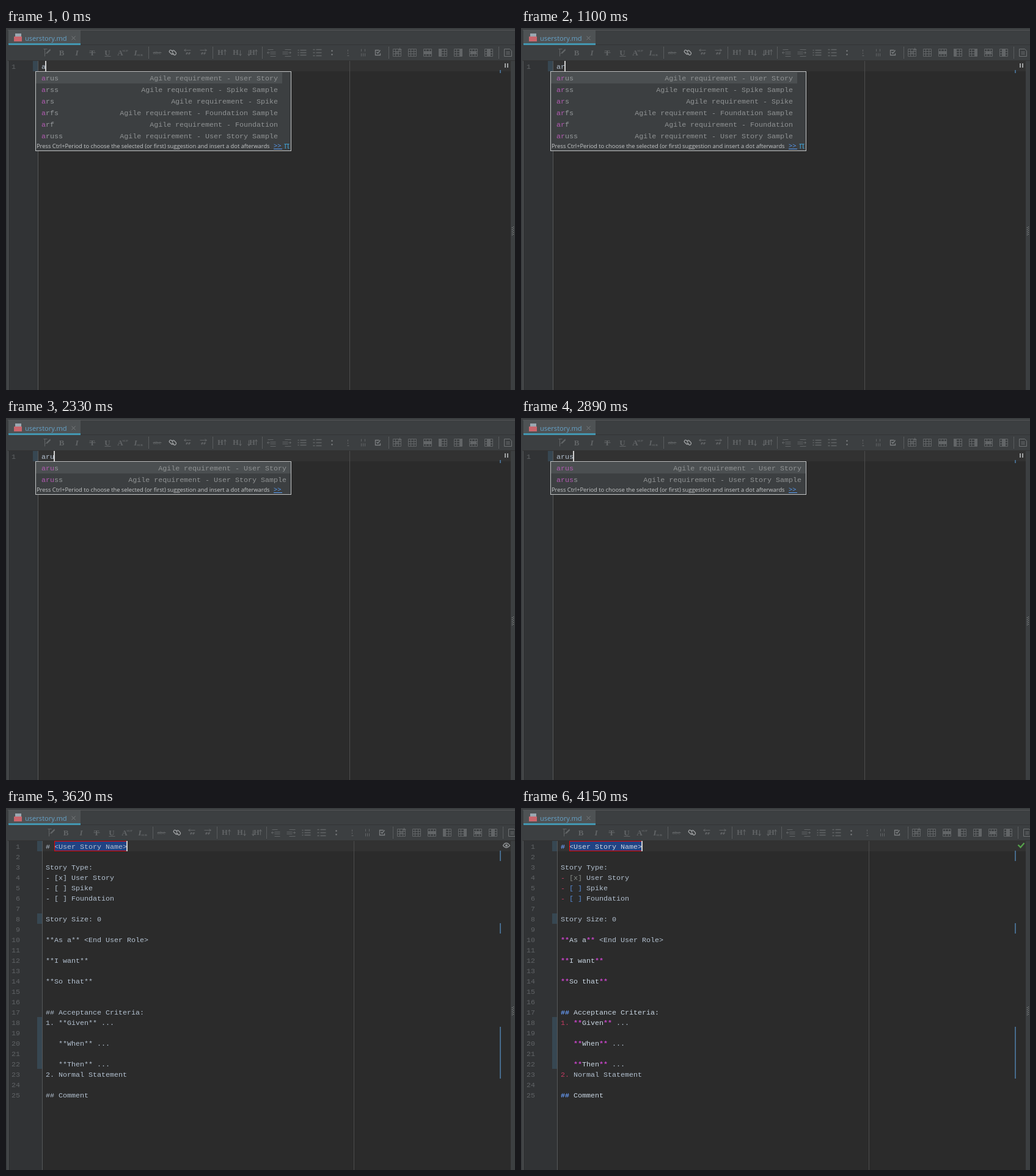
These frames come from a looping animation (833x594 px, 5.01 s). An HTML page with a canvas:

```html
<!DOCTYPE html>
<html lang="en">
<head>
<meta charset="utf-8">
<title>Live template</title>
<style>
html, body { margin: 0; width: 100%; height: 100%; overflow: hidden; background: #2b2b2b; }
canvas { display: block; }
</style>
</head>
<body>
<canvas id="stage" width="833" height="594"></canvas>
<script>
const ctx = document.getElementById('stage').getContext('2d');
const LOOP = 5010, CHAR = 7, LINE = 17, TOP = 54;
const MONO = '11.667px "Liberation Mono", monospace';
const SANS = '"Open Sans", "Noto Sans", sans-serif';
const SERIF = '"Liberation Serif", serif';
const PLAIN = '#b3c1d0', BRIGHT = '#c9d6e2', DIM = '#626567', PINK = '#b35bb3', EDGE = '#555759';

const doc = `# <User Story Name>

Story Type:
- [x] User Story
- [ ] Spike
- [ ] Foundation

Story Size: 0

**As a** <End User Role>

**I want**

**So that**


## Acceptance Criteria:
1. **Given** ...

   **When** ...

   **Then** ...
2. Normal Statement

## Comment`.split('\n');

const items = [
  ['arus', 'User Story'], ['arss', 'Spike Sample'], ['ars', 'Spike'],
  ['arfs', 'Foundation Sample'], ['arf', 'Foundation'], ['aruss', 'User Story Sample']
];

const within = (t, ...spans) => spans.some(([a, b]) => t >= a && t < b);

function rect(x, y, w, h, color) {
  ctx.fillStyle = color;
  ctx.fillRect(x, y, w, h);
}

function text(s, x, y, color, font = MONO, align = 'left') {
  ctx.font = font;
  ctx.fillStyle = color;
  ctx.textAlign = align;
  ctx.fillText(s, x, y);
}

function frame(x, y, w, h, color) {
  ctx.strokeStyle = color;
  ctx.lineWidth = 1;
  ctx.strokeRect(x + .5, y + .5, w - 1, h - 1);
}

function disc(x, y, r, color) {
  ctx.fillStyle = color;
  ctx.beginPath();
  ctx.arc(x, y, r, 0, 7);
  ctx.fill();
}

// Strokes path data placed around a pixel centre
function draw(x, y, d, color = DIM, width = 1) {
  ctx.save();
  ctx.translate(x + .5, y + .5);
  ctx.strokeStyle = color;
  ctx.lineWidth = width;
  ctx.stroke(new Path2D(d));
  ctx.restore();
}

const icon = (x, d, color, width) => draw(x, 40, d, color, width);
const glyph = (x, s, style = 'bold 13px', y = 45) =>
  text(s, x, y, DIM, `${style} ${SERIF}`, 'center');

function toolbar() {
  icon(67, 'M-6-6H0M-4-6V6M-3 2L5-6');
  icon(67, 'M-1 1L5-5', DIM, 2.4);
  glyph(91, 'B');
  glyph(116, 'I', 'italic bold 13px');
  glyph(141, 'T');
  icon(141, 'M-5 0H5');
  glyph(166, 'U');
  icon(166, 'M-5 6H5');
  glyph(187, 'A');
  glyph(195, 'SUP', 'bold 5px', 39);
  glyph(212, 'I', 'italic bold 13px');
  glyph(219, 'SUB', 'bold 5px', 46);
  text('abc', 247, 43, DIM, `8px ${SANS}`, 'center');
  icon(247, 'M-7 0H7');
  icon(272, 'M1-1L-2-4Q-4-5-5-3Q-6-1-4 0L-1 3Q1 3 2 1M-1 0L2 3Q4 5 5 3Q7 1 5-1L2-4Q0-4-1-2', '#a5a7a9', 1.2);
  for (const [x, flip] of [[297, 1], [322, -1]]) {
    icon(x, `M${-6 * flip}-4H${5 * flip}M${-3 * flip}-6L${-6 * flip}-4L${-3 * flip}-2`);
    icon(x, 'M-2 3V1L0 0M2 3V1L4 0', DIM, 2);
  }
  [[353, 'M5 4V-5M3-2L5-5L7-2'], [378, 'M5-4V5M3 2L5 5L7 2'], [403, 'M-6-4V5M-8 2L-6 5L-4 2M6 4V-5M4-2L6-5L8-2']]
    .forEach(([x, d], i) => {
      glyph(i < 2 ? x - 2 : x, 'H', 'bold 12px', 44);
      icon(x, d);
    });
  icon(434, 'M-6-5H3M-2-1H7M-2 2H7M-2 6H7M-7 0H-3M-5-2L-7 0L-5 2');
  icon(459, 'M-3-5H7M-7-1H2M-7 2H2M-3 6H7M7 0H3M5-2L7 0L5 2');
  icon(484, 'M-7-4H-5M-3-4H7M-7 0H-5M-3 0H7M-7 4H-5M-3 4H7', DIM, 1.6);
  icon(509, 'M-7-5H-4M-2-5H7M-7 0H-4M-2 0H7M-7 5H-4M-2 5H7', DIM, 1.4);
  icon(533, 'M-1-3H1M-1 3H1', '#85888a', 2);
  icon(559, 'M0-5V-2M0 0V2M-1 5H2');
  icon(584, 'M-3-6V-2M3-6V-2M-3 1V6M0 1V6M3 1V6');
  icon(608, 'M2-4H-4V4H4V1M-2-1L0 1L4-4', '#7d8082', 1.3);
  const solid = [null, null, [-7, -2, 14, 4], [-7, -6, 5, 12], [2, -6, 5, 12], [-5, -2, 10, 4], [-2, -6, 4, 12]];
  solid.forEach((area, i) => {
    const x = 640 + 25 * i;
    icon(x, 'M-7-6H6V6H-7ZM-7-2H6M-7 2H6M-3-6V6M2-6V6');
    if (area) rect(x + area[0], 40 + area[1], area[2], area[3], DIM);
  });
  icon(640, 'M-3-2L2 2M2-2L-3 2M4-8V-3M2-5H7');
  icon(821, 'M-6-6H3L6-3V6H-6ZM-3-1H3M-3 2H3', '#707375');
  for (const x of [233, 338, 419, 626, 806])
    for (let y = 31; y < 50; y += 2) rect(x, y, 1, 1, '#777a7c');
}

function chrome(shift) {
  rect(0, 0, 833, 594, '#3c3f41');
  rect(3, 3, 830, 1, EDGE);
  rect(4, 4, 118, 21, '#4e5254');
  rect(3, 27, 830, 1, '#323435');
  rect(4, 25, 118, 3, '#4397b1');
  rect(15, 9, 10, 13, '#9aa7b0');
  rect(13, 14, 13, 8, '#c9656c');
  text('userstory.md', 31, 21, '#65a3c9', `11.1px ${SANS}`);
  draw(110, 16, 'M-3-3L3 3M3-3L-3 3', '#777b7d');
  ctx.save();
  ctx.translate(shift, 0);
  toolbar();
  ctx.restore();

  rect(4, 53, 822, 541, '#2b2b2b');
  rect(3, 53, 830, 1, '#323232');
  rect(3, TOP, 1, 540, EDGE);
  rect(4, TOP, 48 + shift, 540, '#313335');
  rect(53 + shift, TOP, 773 - shift, LINE, '#323232');
  rect(52 + shift, TOP, 1, 540, EDGE);
  rect(562 + shift, TOP, 1, 540, '#4d4d4d');
  for (let y = 326; y < 341; y += 3) {
    rect(830, y, 1, 1, '#a5a7a8');
    rect(828, y + 1, 1, 1, '#a5a7a8');
  }
}

const caret = x => rect(x, TOP, 2, LINE, '#d0d0d0');
const change = (x, line, count) => rect(x, TOP + (line - 1) * LINE, 8, count * LINE, '#374752');
const stripe = (y, h) => rect(808, y, 2, h, '#466b8c');

function bulb() {
  rect(453, 86, 6, 4, '#8d8f90');
  disc(456, 81, 5.5, '#f0ac46');
  disc(456, 80, 2.8, '#f8cf86');
}

function popup(prefix) {
  const long = prefix.length < 3;
  const rows = long ? items : items.filter(([key]) => key.startsWith(prefix));
  const height = long ? 131 : 55, base = long ? 197 : 121;
  rect(48, 71, 419, height, '#3c3f41');
  rect(49, 73, long ? 403 : 417, 18, '#4b4f51');
  rows.forEach(([key, name], i) => {
    const y = 86 + 19 * i;
    text(prefix, 58, y, PINK);
    text(key.slice(prefix.length), 58 + prefix.length * CHAR, y, '#969a9c');
    text('Agile requirement - ' + name, long ? 445 : 459, y, '#909394', MONO, 'right');
  });
  text('Press Ctrl+Period to choose the selected (or first) suggestion and insert a dot afterwards',
    50, base, '#c5c7c8', `9.33px ${SANS}`);
  text('>>', 438, base, '#589df6', `11px ${SANS}`);
  rect(438, base + 1, 14, 1, '#589df6');
  if (long) text('π', 455, base + 1, '#3f9ccc', `14px ${SANS}`);
  frame(48, 71, 419, height, '#c3c5c6');
}

function typing(t) {
  const word = 'arus'.slice(0, t < 980 ? 1 : t < 2330 ? 2 : t < 2890 ? 3 : 4);
  chrome(0);
  change(44, 1, 1);
  text('1', 9, 67, '#606366');
  text(word, 58, 67, PLAIN);
  rect(816, 58, 2, 7, '#a0a2a3');
  rect(820, 58, 2, 7, '#a0a2a3');
  stripe(69, 5);
  popup(t < 1100 ? 'a' : word);
  if (within(t, [550, 980], [1630, 2330], [3320, 3620])) bulb();
  if (!within(t, [400, 980], [1930, 2330], [3470, 3620])) caret(57 + word.length * CHAR);
}

function tokenColor(s) {
  if (s[0] === '#') return '#6598f0';
  if (s === '**') return '#c344c3';
  if (s === '[x]') return '#858b86';
  if (s === '[ ]') return '#568bd6';
  return /^(-|\d\.)$/.test(s) ? '#c43c62' : PLAIN;
}

function codeLine(line, y, colored) {
  let x = 65, strong = false;
  for (const part of line.split(/(^#+|^-|^\d\.|\*\*|\[.\])/)) {
    const mark = /^(#|\*)/.test(part);
    const color = !colored ? PLAIN : strong && !mark ? BRIGHT : tokenColor(part);
    text(part, x, y, color, (colored && mark ? 'bold ' : '') + MONO);
    if (mark) strong = !strong;
    x += part.length * CHAR;
  }
}

function template(t) {
  chrome(7);
  change(51, 1, 1);
  change(51, 8, 1);
  change(51, 18, 5);
  stripe(70, 17);
  stripe(189, 17);
  stripe(359, 85);
  rect(79, TOP, 119, LINE, '#214283');
  doc.forEach((line, i) => {
    const y = 67 + i * LINE;
    text(i + 1, 23, y, '#606366', MONO, 'right');
    codeLine(line, y, t >= 4020);
  });
  frame(79, TOP, 119, LINE, '#f00000');
  caret(197);
  if (t < 4150) {
    draw(818, 60, 'M-5 1Q0-7 6 1Q0 8-5 1Z', '#8b8e90', 1.4);
    disc(819, 61.5, 2, '#8b8e90');
  } else {
    draw(818, 60, 'M-5 0L-1 4L5-3', '#55a04b', 2.4);
  }
}

const start = performance.now();

function render() {
  const t = (performance.now() - start) % LOOP;
  (t < 3620 ? typing : template)(t);
  requestAnimationFrame(render);
}

render();
</script>
</body>
</html>
```
